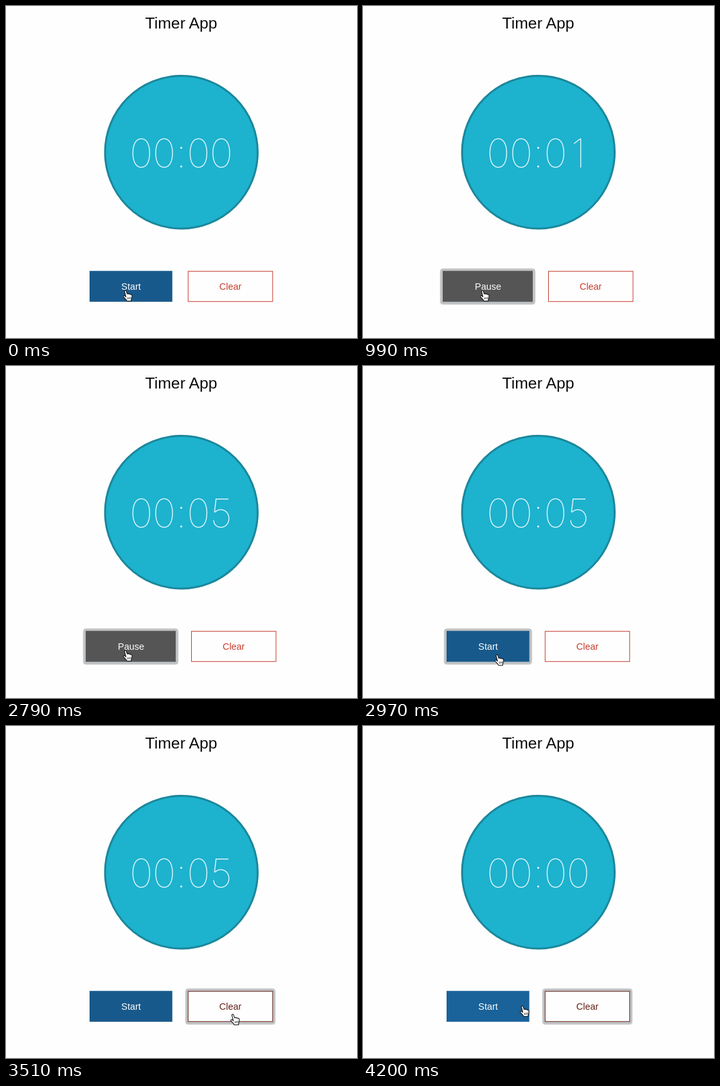
Write an HTML page that moves like this. It is 546 px wide and 516 px high and loops after 4230 ms.

```html
<!DOCTYPE html>
<html lang="en">
<head>
<meta charset="utf-8">
<title>Timer App</title>
<style>
  html, body { margin: 0; width: 100%; height: 100%; overflow: hidden; background: #fefefe; }
  svg { display: block; }
  text { font: 14.4px "Liberation Sans", Arial, sans-serif; text-anchor: middle; }
  .title { font-size: 24.8px; fill: #0a0a0a; }
  .digits { font: 100 61.5px Inter, Roboto, sans-serif; font-optical-sizing: none; fill: #e4f8fb; }
  .ring { fill: none; stroke: #bfc2c4; stroke-width: 3; filter: drop-shadow(0 0 1px #666); }
</style>
</head>
<body>
<svg width="546" height="516" viewBox="0 0 546 516">
  <text class="title" x="272.5" y="35">Timer App</text>
  <circle cx="272.8" cy="227.3" r="118.7" fill="#1db2ce" stroke="#1b879b" stroke-width="3"/>
  <text class="digits" id="clock" x="210.5 246 272.5 299.5 335" y="251.4"></text>

  <rect class="ring" id="mainRing" y="410.5" height="51" rx="2"/>
  <rect id="main" y="411.7" height="48"/>
  <text id="label" x="194.5" y="441" fill="#fefefe"></text>

  <g id="clear">
    <rect class="ring" id="clearRing" x="281.5" y="410.5" width="135" height="51" rx="2"/>
    <rect id="clearBox" x="283.3" y="412.3" width="131.5" height="47" fill="#fefefe"/>
    <text id="clearLabel" x="349" y="441">Clear</text>
  </g>

  <g id="cursor" stroke-linejoin="round">
    <g id="hand" transform="translate(-4 -1) scale(1.1 1.03)" fill="#fff" stroke="#111">
      <path d="M2.2 2.6C1.8.8 3.9.3 4.5 1.9L6 6.5C6.6 5.6 8 5.7 8.3 6.7 9 6 10.2 6.3 10.5 7.3 11.5 6.8 12.6 7.4 12.7 8.6 12.9 11 13 12.5 11.8 14.3L11.5 17H5.5C5 15 2.5 13 .8 10.8 0 9.4 1.6 8.4 2.8 9.4L4.2 10.8Z"/>
      <path d="M6.8 11.5v3M8.8 11.3v3M10.8 11v3" stroke-width=".8"/>
    </g>
    <path id="arrow" d="M0 0V14L3.3 11 5.5 16 7.5 15 5.4 10.3H10Z" fill="#111" stroke="#fff"/>
  </g>
</svg>
<script>
const LOOP = 4230, STEP = 30, FADE = 115;
const $ = id => document.getElementById(id);
const set = (id, attrs) => {
  for (const k in attrs) $(id).setAttribute(k, attrs[k]);
};
const show = (id, on) => set(id, { visibility: on ? "visible" : "hidden" });

const BLUE = [24, 89, 139], BRIGHT = [31, 117, 184], GRAY = [85, 85, 85];
const RED = [198, 60, 44], MAROON = [103, 32, 24];

// [start time, colour faded to]
const mainFades = [[-FADE, BLUE], [510, GRAY], [2850, BLUE], [3510, BRIGHT], [4145, BLUE]];
const clearFades = [[-FADE, RED], [3130, MAROON]];

// [time, x, y] of the pointer's tip
const path = [
  [0, 186, 442], [2910, 186, 442], [3000, 220, 452], [3090, 285, 460],
  [3180, 329, 456], [3270, 344, 458], [3330, 345, 458], [3450, 353, 448],
  [4020, 353, 448], [4080, 318, 443], [4140, 258, 436], [4200, 248, 435]
];

const mix = (a, b, p) => a + (b - a) * p;
const clamp = p => Math.min(1, Math.max(0, p));

function colour(fades, t) {
  let c = fades[0][1];
  for (const [start, to] of fades) {
    const p = 1 - (1 - clamp((t - start) / FADE)) ** 1.7;
    c = c.map((v, i) => mix(v, to[i], p));
  }
  return `rgb(${c.map(Math.round)})`;
}

function pointer(t) {
  const i = path.findIndex(k => k[0] > t);
  if (i < 0) return path[path.length - 1].slice(1);
  const a = path[i - 1], b = path[i], p = (t - a[0]) / (b[0] - a[0]);
  return [mix(a[1], b[1], p), mix(a[2], b[2], p)];
}

function draw(t) {
  const running = t >= 510 && t < 2850;
  const seconds = t < 3570 ? Math.min(5, Math.max(0, Math.floor((t - 540) / 450))) : 0;
  $("clock").textContent = "00:0" + seconds;

  const x = running ? 124 : 130, width = running ? 140 : 128.7;
  $("label").textContent = running ? "Pause" : "Start";
  set("main", { x, width, fill: colour(mainFades, t) });
  set("mainRing", { x: x - 1.5, width: width + 3 });
  show("mainRing", t >= 480 && t < 3480);

  const tone = colour(clearFades, t);
  set("clear", { transform: `translate(${running ? 5.2 : 0} 0)` });
  set("clearBox", { stroke: tone });
  set("clearLabel", { fill: tone });
  show("clearRing", t >= 3480);

  const [px, py] = pointer(t);
  const over = py <= 460 && (px < x + width || px > 283);
  set("cursor", { transform: `translate(${px} ${py})` });
  show("hand", over);
  show("arrow", !over);
}

const begin = performance.now();
function tick() {
  const t = (performance.now() - begin) % LOOP;
  draw(Math.floor(t / STEP) * STEP);
  requestAnimationFrame(tick);
}
tick();
</script>
</body>
</html>
```
